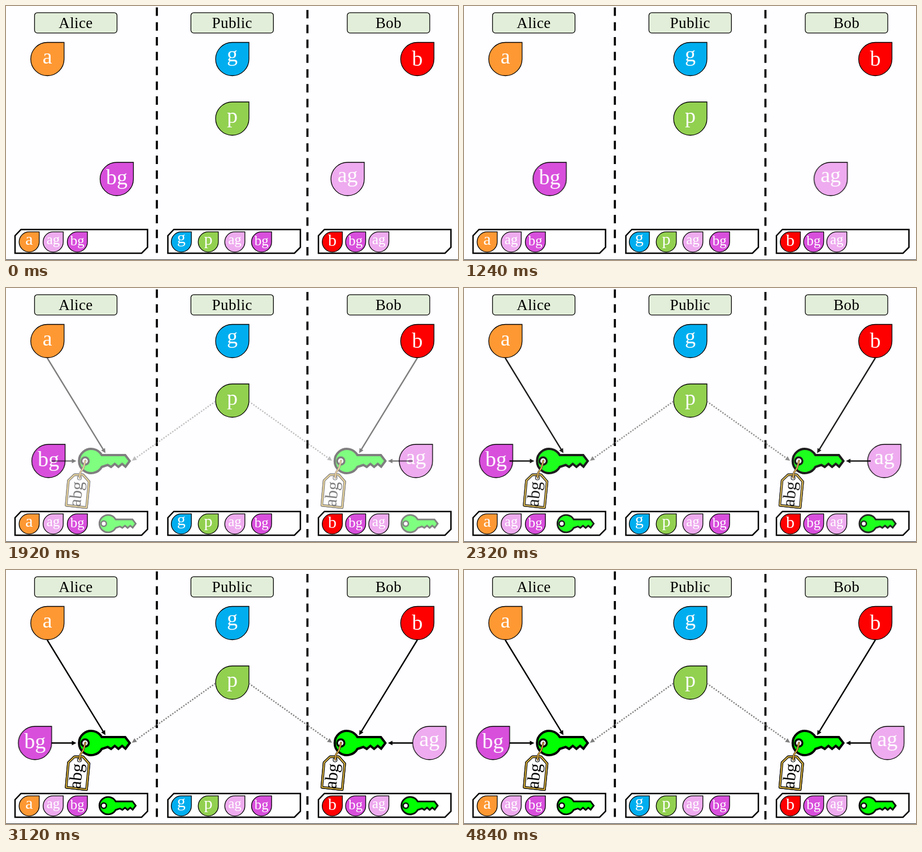
An HTML page that plays this animation: 800x450 px, repeating every 4920 ms.

```html
<!DOCTYPE html>
<html lang="en">
<head>
<meta charset="utf-8">
<title>Key exchange</title>
<style>
  html, body { margin: 0; width: 100%; height: 100%; overflow: hidden; background: #fefdff; }
  svg { display: block; width: 800px; height: 450px; }
  text { font-family: "Liberation Serif", "Times New Roman", serif; text-anchor: middle; }
  .title { font-size: 27px; letter-spacing: .4px; }
  .label { fill: #fff; }
  .slide { animation: slide 4920ms infinite; }
  .reveal { animation: reveal 4920ms infinite; }
  /* cubic ease-in followed by cubic ease-out */
  @keyframes slide {
    0% { transform: translateX(var(--from)); animation-timing-function: cubic-bezier(.3333, 0, .6667, 0); }
    29.675% { transform: translateX(calc(var(--from) / 2)); animation-timing-function: cubic-bezier(.3333, 1, .6667, 1); }
    59.96%, 100% { transform: none; }
  }
  @keyframes reveal {
    0%, 33.54% { opacity: 0; animation-timing-function: cubic-bezier(.3333, 1, .6667, 1); }
    59.96%, 100% { opacity: 1; }
  }
</style>
</head>
<body>
<svg id="stage" viewBox="0 0 800 450" xmlns="http://www.w3.org/2000/svg">
  <defs>
    <g id="key" stroke="#000" stroke-width="4" stroke-linejoin="miter">
      <path fill="#0f0" d="M169.500 296H211L219 306.500L211.500 316.500L205.500 311.500L199 317L192.500 311.500L186 317L180 313.500L169.500 317A21.500 21.500 0 1 1 169.500 296Z"/>
      <circle cx="140" cy="306.500" r="6.500" fill="#fff" stroke-width="3.500"/>
    </g>
    <g id="tag" fill="none" stroke-linejoin="round" stroke-linecap="round">
      <path id="card" d="M110.500 341L121 331H136.500L147 343L142.500 389L106.500 385Z" fill="#fff" stroke="#000" stroke-width="4.400"/>
      <use href="#card" stroke="none"/>
      <path d="M110.500 341L121 331H136.500L147 343L142.500 389L106.500 385Z" stroke="#d9b23f" stroke-width="2.200"/>
      <circle cx="130" cy="336.500" r="3.500" fill="#fff" stroke="#000" stroke-width="1.200"/>
      <path id="cord" d="M140.500 306C138 313 139 317 135 322C131 327 130 330 130.500 336" stroke="#3a2a0a" stroke-width="3.600"/>
      <path d="M140.500 306C138 313 139 317 135 322C131 327 130 330 130.500 336" stroke="#d9a84a" stroke-width="2"/>
      <text transform="translate(134 366) rotate(-83.500)" font-size="31" fill="#000">abg</text>
    </g>
  </defs>
</svg>
<script>
  const colors = {
    a: '#fe9833', g: '#00aeef', b: '#fe0000', p: '#92d050', bg: '#d84fdc', ag: '#eeabef'
  };
  // Baseline below the drop's centre, in units of its radius
  const baselines = { a: .27, g: .13, b: .42, p: .27, bg: .32, ag: .2 };

  function drop(name, x, y, r) {
    const size = r > 20 ? 38 : name.length > 1 ? 25 : 30;
    return `<g transform="translate(${x} ${y})">
      <path d="M0 ${-r}H${r}V0A${r} ${r} 0 1 1 0 ${-r}Z" fill="${colors[name]}" stroke="#000" stroke-width="1.300"/>
      <text class="label" y="${baselines[name] * r}" font-size="${size}">${name}</text></g>`;
  }

  const big = (name, x, y) => drop(name, x, y, 29.5);
  const small = (name, x) => drop(name, x, 418, 17.8);

  function arrow(x1, y1, x2, y2, color = '#000', dash = '') {
    const angle = Math.atan2(y2 - y1, x2 - x1);
    const bx = x2 - 6 * Math.cos(angle), by = y2 - 6 * Math.sin(angle);
    return `<path d="M${x1} ${y1}L${bx} ${by}" fill="none" stroke="${color}" stroke-width="2.400" stroke-dasharray="${dash}"/>
      <path d="M0 0L-8 -4V4Z" fill="${color}" transform="translate(${x2} ${y2}) rotate(${angle * 180 / Math.PI})"/>`;
  }

  const dotted = (x1, x2) => arrow(x1, 201, x2, 306, '#7f7f7f', '2.4 2.4');

  function panel(title, x, boxX) {
    return `<rect x="${x - 73}" y="11.800" width="146" height="36" rx="5" fill="#e2eed9" stroke="#000" stroke-width="1.300"/>
      <text class="title" x="${x}" y="39">${title}</text>
      <path transform="translate(${boxX} 396)" d="M0 42V11L10.500 0H234.500V31.500L224 42Z" fill="#fff" stroke="#000" stroke-width="2.500"/>`;
  }

  const divider = (x, y) =>
    `<path d="M${x} ${y}V442" stroke="#000" stroke-width="3.700" stroke-dasharray="15 11.250"/>`;

  const slider = (name, x, from) =>
    `<g class="slide" style="--from:${from}px">${big(name, x, 306.5)}</g>`;

  const smallKey = x =>
    `<use href="#key" transform="translate(${x} 417.500) scale(.716) translate(-126 -306.500)"/>`;

  const row = (names, xs) => names.map((name, i) => small(name, xs[i])).join('');

  document.getElementById('stage').insertAdjacentHTML('beforeend', [
    '<path d="M0 449.500H800" stroke="#333"/>',
    divider(267, 2.5), divider(533.5, 7),
    panel('Alice', 123.5, 16), panel('Public', 400.3, 286.5), panel('Bob', 677, 553),
    big('a', 73.3, 94), big('g', 400.5, 94), big('b', 728, 94), big('p', 400.5, 199.5),
    row(['a', 'ag', 'bg'], [41, 83.5, 126.3]),
    row(['g', 'p', 'ag', 'bg'], [310.3, 358, 405, 452.3]),
    row(['b', 'bg', 'ag'], [577.5, 618.8, 659.8]),
    slider('bg', 51.3, 144.7), slider('ag', 749.3, -144.7),
    '<g class="reveal">',
    dotted(370.5, 223), dotted(430, 577),
    arrow(73, 124, 176, 292.5), arrow(728, 124, 625, 292.5),
    arrow(80.5, 306.5, 124.5, 306.5), arrow(720, 306.5, 676, 306.5),
    '<use href="#key"/><use href="#tag"/>',
    '<g transform="translate(452.500 0)"><use href="#key"/><use href="#tag"/></g>',
    smallKey(163), smallKey(697.5),
    '</g>'
  ].join(''));
</script>
</body>
</html>
```
